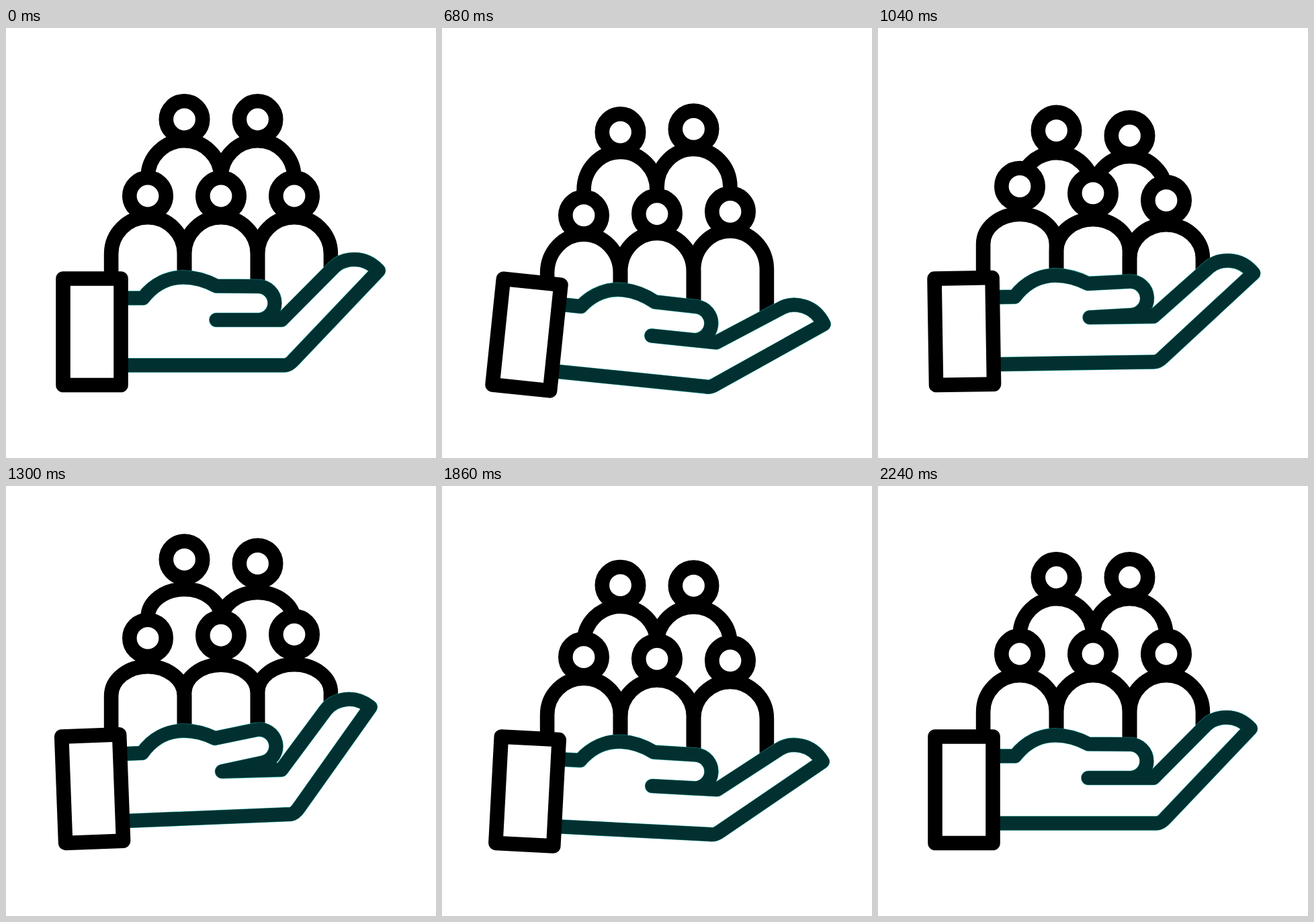
An HTML page that plays this animation: 640x640 px, repeating every 2400 ms.

```html
<!DOCTYPE html>
<html lang="en">
<head>
<meta charset="utf-8">
<title>Hand holding a group</title>
<style>
  html, body { margin: 0; width: 100%; height: 100%; overflow: hidden; background: #fff; }
  svg { display: block; width: 100%; height: 100%; }
  path, circle, rect { stroke-width: 21.6; stroke-linejoin: round; }
  .ink { stroke: #000; fill: #fff; }
  .body { fill: none; }
  .rim { stroke: #1a9c98; fill: #fff; }
  .skin { stroke: #023030; stroke-width: 20.5; fill: none; }
</style>
</head>
<body>
<svg id="stage" viewBox="0 0 640 640"></svg>
<script>
const LOOP = 2400, STEP = 20;
const stage = document.getElementById('stage');

// [time, value] pairs, joined by sine ease-in-out
const WRIST  = [[200, 0], [740, 6.1], [1180, -3], [1700, 3.8], [2240, 0]];
const FINGER = [[200, 0], [760, 12], [1420, -7.6], [1840, 9.2], [2240, 0]];
const THUMB  = [[880, 0], [1400, -11], [1820, 0]];
const BOUNCE = [[200, 0], [730, 29.5], [1195, -29], [1640, 12.3], [2020, 0]];
const SQUASH = [[200, 0], [700, -3.2], [1180, 13], [1600, 0]];

const PIVOT = [85, 435], KNUCKLE = [313, 384], PALM = [410, 434.5];

function track(keys, t) {
  if (t <= keys[0][0]) return keys[0][1];
  for (let i = 1; i < keys.length; i++) {
    const [t0, v0] = keys[i - 1], [t1, v1] = keys[i];
    if (t < t1) return v0 + (v1 - v0) * (1 - Math.cos(Math.PI * (t - t0) / (t1 - t0))) / 2;
  }
  return keys[keys.length - 1][1];
}

// Rotate around `from`, then place that pivot at `to`
function turner(deg, from, to = from) {
  const a = deg * Math.PI / 180, c = Math.cos(a), s = Math.sin(a);
  return (x, y) => {
    const dx = x - from[0], dy = y - from[1];
    return [to[0] + dx * c - dy * s, to[1] + dx * s + dy * c];
  };
}

function add(tag, cls, attrs = {}) {
  const el = document.createElementNS('http://www.w3.org/2000/svg', tag);
  el.setAttribute('class', cls);
  for (const k in attrs) el.setAttribute(k, attrs[k]);
  return stage.appendChild(el);
}

const person = (x, y, delay) => ({
  x, y, delay,
  body: add('path', 'ink body'),
  head: add('circle', 'ink', { cx: x, r: 27.2 })
});
const back = [person(265.5, 136, 165), person(374.5, 136, 220)];
const front = [person(211, 250, 0), person(320, 250, 55), person(429, 250, 110)];
front.forEach(p => stage.append(p.head));
const hand = [add('path', 'rim'), add('path', 'skin')];
const cuff = add('rect', 'ink', { x: 85, y: 373, width: 86, height: 158.5 });

function pose(p, t) {
  p.now = p.y + track(BOUNCE, t - p.delay);
  p.base = p.now + 86;
  p.ry = 54.4 - track(SQUASH, t - p.delay);
  p.head.setAttribute('cy', p.now);
}

function drawBody(p, endL, endR) {
  const l = p.x - 54.4, r = p.x + 54.4;
  p.body.setAttribute('d',
    `M${l} ${endL}V${p.base}A54.4 ${p.ry} 0 0 1 ${r} ${p.base}V${endR}`);
}

function draw(t) {
  const a = track(WRIST, t);
  const wrist = turner(a, PIVOT);
  const palm = wrist(...PALM);
  const finger = turner(a + track(FINGER, t), PALM, palm);
  const thumb = turner(a + track(THUMB, t), KNUCKLE, wrist(...KNUCKLE));
  const pt = (f, ...v) => {
    let s = '';
    for (let i = 0; i < v.length; i += 2) s += f(v[i], v[i + 1]).map(n => n.toFixed(2)).join(' ') + ' ';
    return s;
  };

  const d = 'M' + pt(wrist, 171, 402, 204, 402) +
    'C' + pt(wrist, 221, 380, 243, 371, 264, 371) +
    'C' + pt(wrist, 281, 371, 298, 376, 313, 384) +
    'L' + pt(thumb, 375, 384.5) +
    'A25 25 0 0 1 ' + pt(thumb, 375, 434.5) +
    'L' + pt(thumb, 313, 434.5) +
    'L' + pt(wrist, ...PALM) +
    'L' + pt(finger, 488, 356) +
    'C' + pt(finger, 496, 348, 507, 344.5, 519, 344.5) +
    'C' + pt(finger, 533, 344.5, 545, 351, 554.5, 361) +
    'L' + pt(finger, 428, 494) +
    'Q' + pt(finger, 421, 502, 414, 502) +
    'L' + pt(wrist, 171, 502);
  hand.forEach(el => el.setAttribute('d', d));
  cuff.setAttribute('transform', `rotate(${a} ${PIVOT})`);

  [...back, ...front].forEach(p => pose(p, t));
  back.forEach((p, i) => drawBody(p, front[i].now, front[i + 1].now));
  const low = palm[1] - 35, tip = finger(488, 356)[1] + 15;
  front.forEach((p, i) => drawBody(p, low, i === 2 ? tip : low));
}

let start;
function tick(now) {
  if (start === undefined) start = now;
  draw(Math.floor((now - start) % LOOP / STEP) * STEP);
  requestAnimationFrame(tick);
}
draw(0);
requestAnimationFrame(tick);
</script>
</body>
</html>
```
